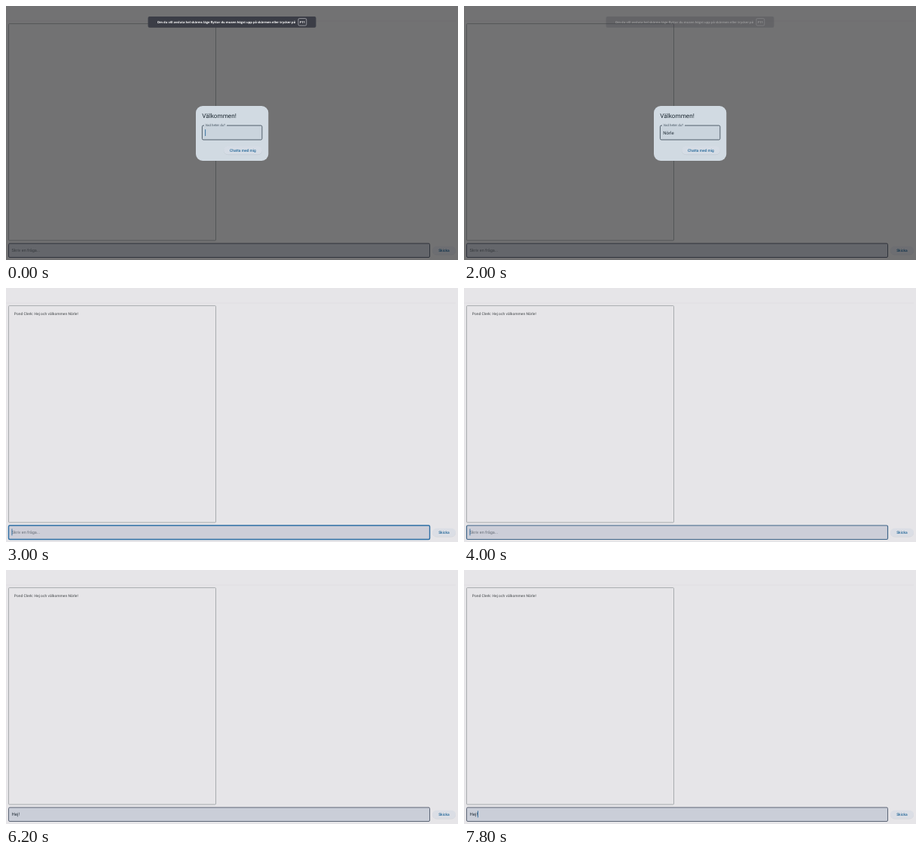
These frames come from a looping animation (600x338 px, 8000 ms). An HTML page:

```html
<!DOCTYPE html>
<html lang="sv">
<head>
<meta charset="utf-8">
<title>Chatt</title>
<style>
  html, body { margin: 0; width: 100%; height: 100%; overflow: hidden; background: #e6e5e8; }
  svg { display: block; width: 100vw; height: 100vh; }
  text { font-family: Roboto, sans-serif; text-rendering: geometricPrecision; white-space: pre; }
  .button { font-size: 4.9px; font-weight: 500; fill: #1f6496; }
  .typed { font-size: 6px; fill: #25313b; }
  .banner text { font: 700 4.09px "Open Sans", sans-serif; fill: #fff; }
  .caret { fill: #2b6a9d; }
</style>
</head>
<body>
<svg viewBox="0 0 600 338" preserveAspectRatio="none">
  <defs>
    <clipPath id="pill"><rect x="289" y="186.4" width="51" height="11.2" rx="5.6"/></clipPath>
  </defs>

  <rect width="600" height="338" fill="#e6e5e8"/>
  <path d="M0 20H597" stroke="#dddce0" stroke-width=".7"/>
  <rect x="3.5" y="23.6" width="275" height="288.4" rx="1" fill="none" stroke="#999da0" stroke-width=".8"/>
  <text id="greeting" x="10.8" y="35.8" font-size="4.95" font-weight="500" fill="#626568">Pond Clerk: Hej och välkommen Nörle!</text>

  <rect id="box" x="3.5" y="316" width="559" height="18.5" rx="1.5"/>
  <text id="hint" x="7.5" y="327" font-size="5.5" fill="#697079">Skriv en fråga...</text>
  <text id="question" class="typed" x="7.5" y="327.3"></text>
  <rect id="questionCaret" class="caret" y="320.5" width=".9" height="8.8"/>
  <rect x="566" y="320.4" width="31" height="11" rx="5.5" fill="#c9ccd2" opacity=".6"/>
  <rect x="566" y="319.8" width="31" height="11" rx="5.5" fill="#dbdee5"/>
  <text class="button" x="581.4" y="327" text-anchor="middle">Skicka</text>

  <g id="modal">
    <rect width="600" height="338" opacity=".5"/>
    <rect x="252" y="133" width="96.3" height="73" rx="9" fill="#d1dae2"/>
    <text x="260.2" y="149.3" font-size="8.2" fill="#1d2932">Välkommen!</text>
    <rect x="260.4" y="159" width="79.5" height="19" rx="1.5" fill="#cad4dd"/>
    <path d="M263 159H262Q260.4 159 260.4 160.6V176.4Q260.4 178 262 178H338.3Q339.9 178 339.9 176.4V160.6Q339.9 159 338.3 159H293"
      fill="none" stroke="#42505c" stroke-width=".9"/>
    <text x="264.4" y="160.4" font-size="4.4" fill="#43525f">Vad heter du?</text>
    <text id="name" class="typed" x="264.2" y="170.6"></text>
    <rect id="nameCaret" class="caret" y="164.2" width=".9" height="8.8"/>
    <rect x="289" y="187" width="51" height="11.2" rx="5.6" fill="#b9c2cb" opacity=".7"/>
    <g clip-path="url(#pill)">
      <rect id="start" x="289" y="186" width="51" height="12"/>
      <circle id="ripple" cx="305" cy="193" fill="#9dbfd9"/>
    </g>
    <text class="button" x="314.4" y="193.8" text-anchor="middle">Chatta med mig</text>
  </g>

  <g id="banner" class="banner">
    <rect x="188.5" y="14" width="223" height="14.7" rx="2" fill="#3b3d46"/>
    <text x="200.8" y="22.8">Om du vill avsluta hel skärms läge flyttar du musen högst upp på skärmen eller trycker på</text>
    <rect x="388" y="16.6" width="10.8" height="9.4" rx="1.5" fill="none" stroke="#d4d4d8" stroke-width=".6"/>
    <text x="393.4" y="22.8" text-anchor="middle">F11</text>
  </g>
</svg>

<script>
const LOOP = 8000;
const TICK = 200;
const $ = id => document.getElementById(id);
const set = (id, attrs) => {
  for (const key in attrs) $(id).setAttribute(key, attrs[key]);
};
const show = (id, on) => set(id, { visibility: on ? 'visible' : 'hidden' });
const ramp = (t, from, to) => Math.min(1, Math.max(0, (t - from) / (to - from)));
const blend = (a, b, k) => `rgb(${a.map((v, i) => Math.round(v + (b[i] - v) * k))})`;

// Each table holds [start time, value].
const nameKeys = [[0, ''], [400, 'N'], [600, 'Nö'], [800, 'Nör'], [1000, 'Nörl'], [1200, 'Nörle']];
const questionKeys = [[0, ''], [5000, 'He'], [5200, 'Hej!']];
const nameBlink = [[0, 1], [200, 0], [400, 1], [1800, 0], [2200, 1], [2600, 0]];
const questionBlink = [[0, 0], [3000, 1], [3600, 0], [3800, 1], [4400, 0], [4800, 1],
  [5400, 0], [5800, 1], [6200, 0], [6800, 1], [7200, 0], [7800, 1]];

const at = (table, t) => table.reduce((v, [start, next]) => t >= start ? next : v, table[0][1]);

function type(id, text, caretOn) {
  const field = $(id);
  if (field.textContent !== text) field.textContent = text;
  const width = text ? field.getComputedTextLength() : 0;
  set(id + 'Caret', { x: +field.getAttribute('x') + width });
  show(id + 'Caret', caretOn);
}

function draw(time) {
  const t = Math.floor(time % LOOP / TICK) * TICK;
  const open = t < 3000;

  $('modal').style.display = open ? '' : 'none';
  show('greeting', !open);
  type('name', at(nameKeys, t), open && at(nameBlink, t));
  set('banner', { opacity: 1 - ramp(t, 1400, 2200) });
  set('start', { fill: t < 2400 ? '#d5dce5' : '#b9cbdc' });
  set('ripple', { r: 20 * ramp(t, 2400, 2800) });

  const question = at(questionKeys, t);
  type('question', question, at(questionBlink, t));
  show('hint', !question);

  const calm = open ? 1 : ramp(t, 3600, 4400);
  set('box', {
    fill: blend([205, 206, 216], [202, 206, 216], calm),
    stroke: blend([45, 111, 165], [78, 89, 106], calm),
    'stroke-width': 1.4 - .5 * calm
  });
}

const origin = performance.now();
function frame() {
  draw(performance.now() - origin);
  requestAnimationFrame(frame);
}
frame();
</script>
</body>
</html>
```
